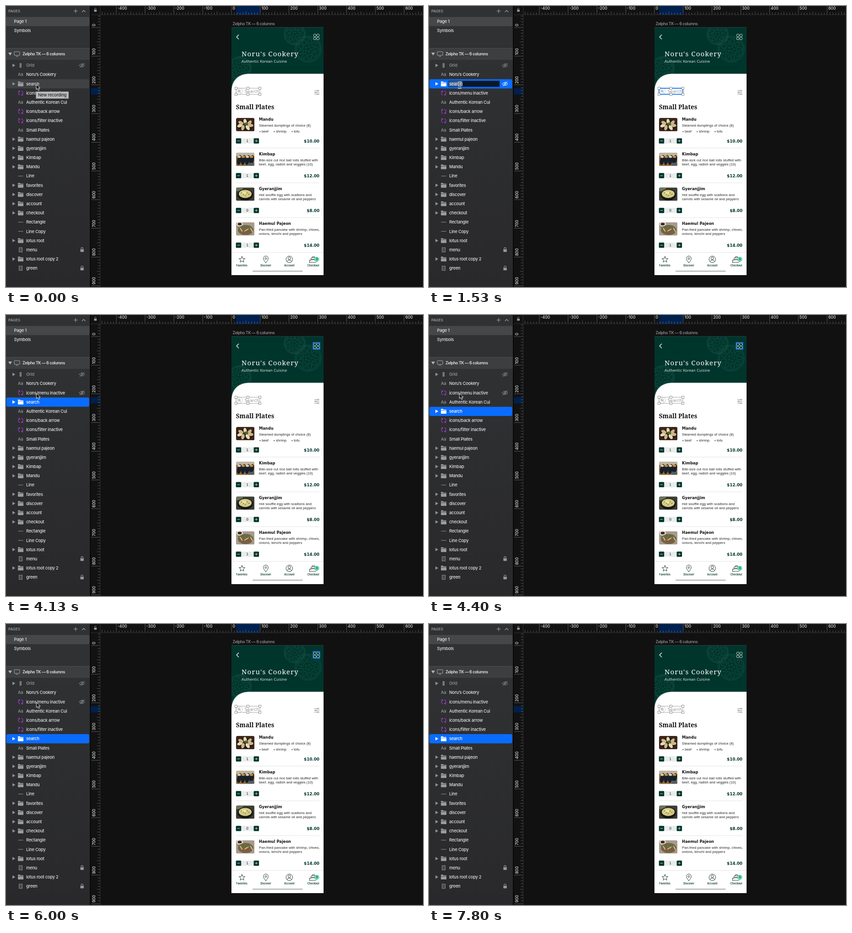
An HTML page for the animation above (7.94 s loop, 910 by 615 pixels).

```html
<!DOCTYPE html>
<html lang="en">
<head>
<meta charset="utf-8">
<title>Layer reorder</title>
<style>
html, body { margin: 0; width: 100%; height: 100%; overflow: hidden; background: #111112; }
svg { display: block; width: 100vw; height: 100vh; }
text { white-space: pre; }
.ui { font: 500 9.3px Inter, sans-serif; letter-spacing: -.25px; fill: #e4e4e5; }
.dim { fill: #97989a; }
.board { font-size: 8.8px; letter-spacing: -.4px; }
.strong { font-weight: 600; }
.rule { font: 500 8.6px Inter, sans-serif; fill: #dcdcdc; }
.slab { font-family: "Noto Serif", serif; }
.wide { font-family: "DejaVu Sans", sans-serif; }
.bold { font-weight: 700; }
.body { font: 7.6px "Liberation Sans", sans-serif; letter-spacing: .07px; fill: #222; }
.tab { font: 600 5.5px Inter, sans-serif; fill: #00352c; text-anchor: middle; }
.line { fill: none; stroke-linecap: round; stroke-linejoin: round; }

.anim { animation: 7.94s step-end infinite; }
.before { animation-name: before; }
.after { animation-name: after; }
.pick { animation-name: pick; }
.edit1 { animation-name: edit1; }
.edit2 { animation-name: edit2; }
.outline { animation-name: outline; }
.hover { animation-name: hover; }
.beam { animation-name: edit1; }
.arrow { animation-name: arrow; }
.guide { animation-name: guide; }
.down { animation-name: down; }
.up1 { animation-name: up1; }
.up2 { animation-name: up2; }
.up3 { animation-name: up3; }
.up4 { animation-name: up4; }

@keyframes before { 0% { visibility: visible } 12.59%, 100% { visibility: hidden } }
@keyframes after { 0% { visibility: hidden } 12.59%, 100% { visibility: visible } }
@keyframes pick { 0% { visibility: hidden } 12.59% { visibility: visible } 25.18%, 100% { visibility: hidden } }
@keyframes edit1 { 0% { visibility: hidden } 19.26% { visibility: visible } 25.18%, 100% { visibility: hidden } }
@keyframes edit2 { 0% { visibility: hidden } 25.18% { visibility: visible } 38.66%, 100% { visibility: hidden } }
@keyframes outline { 0% { visibility: hidden } 12.59% { visibility: visible } 38.66%, 100% { visibility: hidden } }
@keyframes hover { 0% { visibility: hidden } 38.66% { visibility: visible } 84%, 100% { visibility: hidden } }
@keyframes guide { 0% { visibility: hidden } 87.27% { visibility: visible } 88.16%, 100% { visibility: hidden } }
@keyframes arrow {
  0% { visibility: visible; transform: translate(66px, 171.5px) }
  19.26% { visibility: hidden; transform: translate(66px, 171.5px) }
  25.18% { visibility: visible; transform: translate(66.5px, 171.5px) }
  84% { visibility: visible; transform: translate(92px, 160px) }
  84.75% { visibility: visible; transform: translate(155px, 128px) }
  85.64% { visibility: visible; transform: translate(245px, 92px) }
  86.52% { visibility: visible; transform: translate(345px, 50px) }
  87.27%, 100% { visibility: hidden; transform: translate(433px, 14px) }
}
@keyframes down {
  0% { transform: none }
  38.66% { transform: translateY(20.18px) }
  55.41% { transform: translateY(40.36px) }
  62.97% { transform: translateY(60.54px) }
  71.41%, 100% { transform: translateY(80.72px) }
}
@keyframes up1 { 0% { transform: none } 38.66%, 100% { transform: translateY(-20.18px) } }
@keyframes up2 { 0% { transform: none } 55.41%, 100% { transform: translateY(-20.18px) } }
@keyframes up3 { 0% { transform: none } 62.97%, 100% { transform: translateY(-20.18px) } }
@keyframes up4 { 0% { transform: none } 71.41%, 100% { transform: translateY(-20.18px) } }
</style>
</head>
<body>
<svg id="stage" viewBox="0 0 910 615" xmlns="http://www.w3.org/2000/svg"></svg>
<script>
const GREEN = '#00352c', BLUE = '#0a6cff';
const range = (n, fn) => Array.from({ length: n }, (_, i) => fn(i)).join('');
const text = (x, y, s, cls = 'ui', more = '') => `<text x="${x}" y="${y}" class="${cls}" ${more}>${s}</text>`;
const rect = (x, y, w, h, fill, more = '') => `<rect x="${x}" y="${y}" width="${w}" height="${h}" fill="${fill}" ${more}/>`;
const path = (d, stroke, width = 1, more = '') => `<path class="line" d="${d}" stroke="${stroke}" stroke-width="${width}" ${more}/>`;
const ring = (x, y, r, stroke, width = 1, fill = 'none') => `<circle cx="${x}" cy="${y}" r="${r}" fill="${fill}" stroke="${stroke}" stroke-width="${width}"/>`;
const blob = (x, y, rx, ry, fill, turn = 0) => `<ellipse cx="${x}" cy="${y}" rx="${rx}" ry="${ry}" fill="${fill}" transform="rotate(${turn} ${x} ${y})"/>`;
const at = (x, y, body) => `<g transform="translate(${x} ${y})">${body}</g>`;
const anim = (cls, body) => `<g class="anim ${cls}">${body}</g>`;

// Sidebar
const eye = color => at(166, 0, path('M-6 0Q0-7.5 6 0Q0 7.5-6 0Z', color, .9) + ring(0, 0, 1.9, color, .9) + path('M-5 4.8L5-4.8', color));
const lock = at(166, 0, rect(-3.7, -1, 7.4, 5.6, '#98999b', 'rx="1"') + path('M-2.2-1V-2.8a2.2 2.2 0 0 1 4.4 0V-1', '#98999b', 1.1));
const triangle = color => `<path d="M14-3.7L20.4 0L14 3.7Z" fill="${color}"/>`;
const folder = color => `<path d="M26-4.3q0-.9.9-.9h3.4l1.2 1.5h5.6q.9 0 .9.9v.7H26zM26-1.3h12v5.7q0 .9-.9.9H26.9q-.9 0-.9-.9z" fill="${color}"/>`;
const icons = {
  grid: triangle('#8d8e90') + rect(29.6, -5, 4.4, 10, '#77787a'),
  text: text(26, 3.3, 'Aa', 'ui dim'),
  folder: triangle('#8d8e90') + folder('#9b9c9e'),
  symbol: path('M30.5 4.5Q27 3.5 27 0Q27-2.5 29.2-4M27-4.5h2.7v2.6M33.5-4.5Q37-3.5 37 0Q37 2.5 34.8 4M37 4.5h-2.7V1.9', '#a53fd0', 1.1),
  line: path('M27 0H37', '#9b9c9e'),
  shape: rect(28.5, -4.8, 7, 9.6, '#48494b', 'stroke="#949597" stroke-width=".9"')
};
const layers = `grid:Grid
text:Noru’s Cookery
folder:search
symbol:icons/menu inactive
text:Authentic Korean Cui
symbol:icons/back arrow
symbol:icons/filter inactive
text:Small Plates
folder:haemul pajeon
folder:gyeranjjim
folder:Kimbap
folder:Mandu
line:Line
folder:favorites
folder:discover
folder:account
folder:checkout
line:Rectangle
line:Line Copy
folder:lotus root
shape:menu
folder:lotus root copy 2
shape:green`.split('\n').map(s => s.split(':'));

const field = right => rect(43, -6.6, right - 43, 13.2, '#0b1726', 'stroke="#0a438f" stroke-width=".8"') +
  rect(44, -5.6, 29.5, 11.2, '#45688f') + text(44, 3.3, 'search');

function layer([kind, name], i) {
  let body = icons[kind] + text(44, 3.3, name, name === 'Grid' ? 'ui dim' : 'ui');
  if (i === 0) body += eye('#8f9092');
  if (kind === 'shape') body += lock;
  if (i === 3) body += anim('hover', eye('#a0a1a3'));
  if (name === 'search') {
    body = anim('before', rect(1, -10, 180.5, 20, '#404143', 'rx="3"')) + body +
      anim('after', rect(1, -10, 180.5, 20.2, BLUE, 'rx="3"') + triangle('#fff') + folder('#fff') + text(44, 3.3, name, 'ui', 'style="fill:#fff"')) +
      anim('pick', eye('#fff')) + anim('edit1', field(154)) + anim('edit2', field(178.5));
  }
  const move = i === 2 ? 'down' : i > 2 && i < 7 ? 'up' + (i - 2) : '';
  const row = at(0, 130 + 20.18 * i, body);
  return move ? anim(move, row) : row;
}

function sidebar() {
  return rect(0, 0, 184, 615, 'url(#side)') + rect(0, 0, 184, 93, '#303133') +
    rect(0, 24, 182, 20, '#464749', 'rx="2"') + rect(0, 92.5, 184, 24.5, '#3d3e40') +
    rect(0, 92, 184, 1, '#4b4c4e') + rect(0, 116.5, 184, .8, '#48494b') +
    text(5, 14, 'PAGES', 'ui dim strong', 'style="font-size:8px;letter-spacing:0"') +
    path('M148 11h8M152 7v8', '#a5a6a8', 1.1) + path('M166 13l3.5-3.5L173 13', '#a5a6a8', 1.1) +
    text(17.5, 37.4, 'Page 1') + text(17.5, 57.4, 'Symbols') +
    '<path d="M5 102h8l-4 6.2z" fill="#b4b5b7"/>' +
    rect(18, 100, 12, 8, 'none', 'rx="1" stroke="#a9aaac"') + path('M22 110.3h4', '#a9aaac') +
    text(36, 108.3, 'Zelpho TK — 6 columns', 'ui board strong') +
    layers.map(layer).join('') + rect(183, 0, 2, 615, '#070708');
}

// Rulers: ten units every 6.28 px
function rulers() {
  const unit = .628, x0 = 492, y0 = 47;
  const ticks = (origin, first, last, draw) => range(last - first + 1, k => {
    const n = (first + k) * 10;
    return draw(origin + n * unit, n, n % 100 === 0 ? 19 : n % 50 === 0 ? 6.5 : 4.5);
  });
  return rect(185, 0, 725, 19, '#121213') + rect(185, 0, 20, 615, '#121213') +
    rect(502, 0, 52, 19, '#00204d') + rect(185, 180, 20, 13.5, '#00204d') +
    ticks(x0, -45, 66, (x, n, h) => rect(x - .3, 19 - h, .7, h, x > 502 && x < 554 ? '#6d8fc0' : '#747476') +
      (n % 100 ? '' : text(x + 2.6, 8, n, 'rule'))) +
    ticks(y0, -4, 90, (y, n, h) => rect(205 - h, y - .3, h, .7, '#747476') +
      (n % 100 ? '' : text(0, 0, n, 'rule', `transform="translate(195 ${y - 2.6}) rotate(-90)"`))) +
    rect(185, 0, 20, 19, '#121213') + rect(205, 0, .8, 615, '#39393b') + rect(185, 18.7, 725, .8, '#39393b') +
    rect(192.3, 8, 5.6, 4.6, '#9a9a9c', 'rx=".8"') + path('M193.5 8V6.3a1.7 1.7 0 0 1 3.4 0', '#9a9a9c', .9) +
    anim('guide', rect(417.5, 0, 20.5, 12, '#121213') + rect(416.7, 0, 1, 19, '#d2413a') + text(420.5, 8, '-118', 'rule'));
}

// Phone screen
const lotus = (x, y, r, turn) => at(x, y, `<g fill="none" stroke="#1f5a4c" stroke-width=".8" transform="rotate(${turn})">
  <circle r="${r}"/><circle r="${r * .9}"/>${range(9, i =>
    `<ellipse cx="${r * .6}" rx="${r * .21}" ry="${r * .14}" transform="rotate(${i * 40})"/>`)}${range(5, i =>
    `<circle cx="${r * .2}" r="${r * .045}" transform="rotate(${i * 72})"/>`)}</g>`);

const photos = [
  rect(0, 0, 40, 29, '#3b271b') + blob(20, 16, 18, 11, '#1d1713') +
    range(7, i => blob(20 + 12 * Math.cos(i * .9 + .2), 15 + 7 * Math.sin(i * .9 + .2), 6, 3.6, i % 2 ? '#e9d8b4' : '#cfb588', i * 52)) +
    blob(22, 13, 4.5, 3, '#4c6a2b'),
  rect(0, 0, 40, 29, '#95703f') + rect(0, 0, 40, 7, '#c0b7a3') + range(4, i =>
    blob(7 + i * 9, 16, 4.7, 11, '#17202a', 12) + blob(7 + i * 9, 9, 3.5, 2.5, i % 2 ? '#cf8b3b' : '#d8d2b8')) + blob(33, 25, 7, 3, '#485f75'),
  rect(0, 0, 40, 29, '#3d3d36') + rect(0, 0, 15, 8, '#6a7460') + blob(20, 16, 17, 12.5, '#161816') + blob(20, 14, 14, 9, '#d6ca83') +
    blob(17, 12, 6, 3, '#ebe1a8') + range(5, i => blob(12 + i * 4, 12 + i % 3 * 3, 1.5, .9, '#66803b', i * 40)),
  rect(0, 0, 40, 29, '#a99a8c') + blob(21, 17, 17, 11, '#6e6548') + range(8, i =>
    blob(8 + i * 3.7, 13 + i % 3 * 4, 6, 1.2, ['#587b36', '#d7bd78', '#a5453c'][i % 3], 25 + i * 31)) +
    blob(8, 4, 7, 5, '#e5e1db') + blob(8, 4, 4.5, 3, '#45281f')
];
const dishes = [
  ['Mandu', ['Steamed dumplings of choice (8)'], 1, '10'],
  ['Kimbap', ['Bite-size cut rice ball rolls stuffed with', 'beef, egg, radish and veggies (10)'], 1, '12'],
  ['Gyeranjjim', ['Hot souffle egg with scallions and', 'carrots with sesame oil and peppers'], 0, '8'],
  ['Haemul Pajeon', ['Pan-fried pancake with shrimp, chives,', 'onions, kimchi and peppers'], 1, '14']
];
const button = (x, d) => rect(x, 289.5, 11.5, 11.5, GREEN, 'rx="1.5"') + path(d, '#fff', .8);

const dish = ([name, lines, count, price], i) => at(0, i * 76.1,
  `<g transform="translate(502 245)" clip-path="url(#photo)">${photos[i]}</g>` +
  text(552, 251, name, 'wide bold', 'font-size="8.3" fill="#111"') +
  lines.map((s, k) => text(552, 264.2 + k * 8.8, s, 'body')).join('') +
  (i ? '' : text(553, 276.6, '• beef', 'body') + text(584, 276.6, '• shrimp', 'body') + text(623, 276.6, '• tofu', 'body')) +
  rect(513, 289.5, 28, 11.5, '#e9eeec') + button(501.7, 'M505 295.2h5') + button(540.6, 'M543.8 295.2h5M546.3 292.7v5') +
  text(526.6, 298, count, 'wide', 'font-size="7.6" fill="#222" text-anchor="middle"') +
  text(684, 299.2, `$${price}.00`, 'wide bold', `font-size="8.8" fill="${GREEN}" text-anchor="end"`) +
  rect(i < 3 ? 502 : 492, 310.6, i < 3 ? 182 : 201, .7, '#d5d7d6'));

function star() {
  const points = Array.from({ length: 10 }, (_, i) => {
    const r = i % 2 ? 3.1 : 6.9, a = i * Math.PI / 5;
    return `${515 + r * Math.sin(a)} ${555 - r * Math.cos(a)}`;
  });
  return path('M' + points.join('L') + 'Z', '#152b26', .9);
}

const tabs = () => star() +
  path('M567 562Q561.6 555.5 561.6 552.6a5.4 5.4 0 0 1 10.8 0Q572.4 555.5 567 562Z', '#152b26', .9) + ring(567, 552.6, 1.9, '#152b26', .9) +
  ring(618.3, 554.5, 7.2, '#152b26', .9) + ring(618.3, 552.3, 2.8, '#152b26', .9) + path('M613.3 559.5q1.5-3.6 5-3.6t5 3.6', '#152b26', .9) +
  path('M662.5 556.5h3l2-1.3h5l1 1.5h5M662.5 561h13l4-3M662.5 556v5.5M665 554.5l1.5-3.5h9l1.5 3.5zM668 551l1-2.5h4l1 2.5', '#152b26', .9) +
  ring(678.3, 554.3, 5.3, 'none', 0, '#62d9ac') + text(678.3, 556.4, '3', 'tab') +
  text(514.5, 569.7, 'Favorites', 'tab') + text(567, 569.7, 'Discover', 'tab') +
  text(618.3, 569.7, 'Account', 'tab') + text(670.6, 569.7, 'Checkout', 'tab') +
  rect(538, 579, 109.5, 2.8, '#bcbdbd', 'rx="1.4"');

const handles = color => [502, 528, 554].map(x => [180, 193.3].map(y =>
  rect(x - 2.4, y - 2.4, 4.8, 4.8, '#fff', `stroke="${color}" stroke-width=".8"`)).join('')).join('');

function phone() {
  const edge = 'M492 188C492 163 507 148.5 531 148.5H693';
  return text(494.5, 41.6, 'Zelpho TK — 6 columns', 'ui board dim') +
    '<g clip-path="url(#screen)">' + rect(492, 47, 201, 542, GREEN) +
    lotus(630, 62, 23, 10) + lotus(659.5, 94.5, 28.5, 0) + lotus(510, 136, 25, 20) +
    path(edge, '#1f5347', 2.6) + `<path d="${edge}V589H492Z" fill="#fff"/></g>` +
    rect(492, 46.5, 201, .7, '#31584f') +
    path('M507.6 63.2L503.2 67.8L507.6 72.4', '#fff', 1.3) +
    range(4, i => ring(674 + i % 2 * 6.9, 64.2 + (i >> 1) * 6.9, 2.9, '#dce7e3', .9)) +
    anim('hover', rect(670.2, 60.4, 14.6, 14.6, 'none', 'stroke="#1677f2" stroke-width="1.7"')) +
    text(514, 110, "Noru's Cookery", 'slab', 'font-size="15" font-weight="500" letter-spacing="1.1" fill="#fff"') +
    text(514, 124.3, 'Authentic Korean Cuisine', 'wide', 'font-size="7.9" fill="#dbe5e2"') +
    ring(509, 186.6, 6.8, '#b9bbbb', .8) + ring(508.4, 186, 2.2, '#555', .8) + path('M510.1 187.7l2 2', '#555', .8) +
    text(520.7, 190, 'Search', 'wide', 'font-size="9.2" fill="#909293"') +
    rect(502, 180, 52, 13.3, 'none', 'stroke="#909193" stroke-width=".8"') + handles('#77787a') +
    anim('outline', rect(502, 180, 52, 13.3, 'none', 'stroke="#1677f2" stroke-width="1.8"') + handles('#8a8b8d')) +
    range(3, i => path(`M673 ${185.2 + i * 3.9}h10.6`, '#777', .8) + ring([680.5, 676, 680.5][i], 185.2 + i * 3.9, 1.3, '#777', .8, '#fff')) +
    text(501.7, 226, 'Small Plates', 'slab', 'font-size="13.5" font-weight="600" fill="#111"') +
    dishes.map(dish).join('') + tabs();
}

const pointers = () =>
  anim('before', rect(65.5, 187.5, 71, 15, '#b9babb', 'stroke="#8b8c8d" stroke-width=".8"') +
    text(70, 198.4, 'New recording', 'ui', 'style="fill:#242526"')) +
  anim('beam', path('M64.3 166q2.7 0 2.7 2v10q0 2 2.7 2M69.7 166q-2.7 0-2.7 2M67 178q0 2-2.7 2M65 175h4', '#fff', 2.4) +
    path('M64.3 166q2.7 0 2.7 2v10q0 2 2.7 2M69.7 166q-2.7 0-2.7 2M67 178q0 2-2.7 2M65 175h4', '#111', 1)) +
  anim('arrow', '<path d="M0 0V11.3L2.6 8.9L4.5 13.2L6.6 12.3L4.8 8.1H8.3Z" fill="#050505" stroke="#fff" stroke-width="1" stroke-linejoin="round"/>') +
  anim('guide', at(433, 14, '<path d="M-7 0L-3.4-3.6V-1.4H-1.4V-3.4H-3.3L0-7L3.3-3.4H1.4V-1.4H3.4V-3.6L7 0L3.4 3.6V1.4H1.4V3.4H3.3L0 7L-3.3 3.4H-1.4V1.4H-3.4V3.6Z" fill="#050505" stroke="#fff" stroke-width="1.1" stroke-linejoin="round"/>'));

document.getElementById('stage').innerHTML = `<defs>
  <linearGradient id="side" x2="0" y2="1"><stop offset=".15" stop-color="#303133"/><stop offset="1" stop-color="#29292b"/></linearGradient>
  <clipPath id="photo"><rect width="40.3" height="29.3" rx="3.5"/></clipPath>
  <clipPath id="screen"><rect x="492" y="47" width="201" height="542"/></clipPath>
</defs>` + rect(0, 0, 910, 615, '#111112') + rulers() + phone() + sidebar() + pointers();
</script>
</body>
</html>
```
